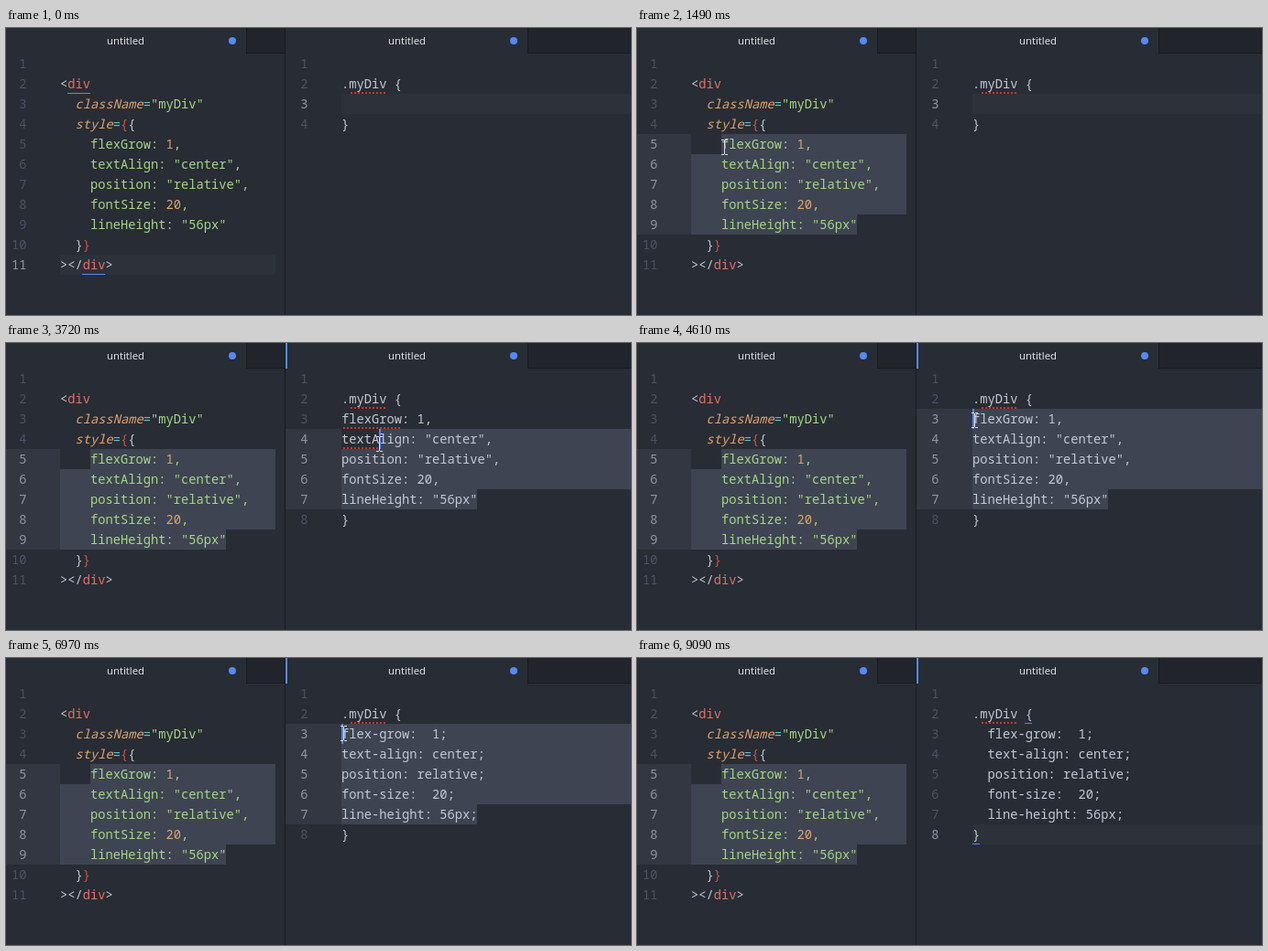
Animation of 682 by 314 pixels, one loop 9520 ms. Source, as an HTML page with a canvas:

```html
<!DOCTYPE html>
<html lang="en">
<head>
<meta charset="utf-8">
<title>Inline style to CSS</title>
<style>
html, body { margin: 0; width: 100%; height: 100%; overflow: hidden; background: #282c34; }
canvas { display: block; width: 682px; height: 314px; }
</style>
</head>
<body>
<canvas id="stage"></canvas>
<script>
const W = 682, H = 314, LOOP = 9520;
const TOP = 28, ROW = 22, CHAR = 8.25;
const MONO = '13.75px "Noto Sans Mono", monospace';
const C = {
  bg: '#282c34', bar: '#21252b', border: '#181a1f', line: '#2c313a', gutter: '#323741',
  select: '#3e4451', text: '#c3c9d4', dim: '#4b5363', number: '#8f96a3', title: '#e8ebf0',
  red: '#e66d66', green: '#a6d687', orange: '#dfa46e', cyan: '#5fc3cf', brick: '#cc5546',
  blue: '#528bff', accent: '#568af2', spell: '#c8372d', mouse: '#dcdee2'
};

const canvas = document.getElementById('stage');
const ctx = canvas.getContext('2d');
const ratio = window.devicePixelRatio || 1;
canvas.width = W * ratio;
canvas.height = H * ratio;
ctx.scale(ratio, ratio);

// A line of code is a list of [text, color, italic] tokens.
const plain = s => [[s, 'text']];
const prop = (name, value, color, end = ',') =>
  [[`    ${name}: `, 'green'], [value, color], [end, 'green']];
const jsx = [
  [],
  [['<', 'text'], ['div', 'red']],
  [['  className', 'orange', true], ['=', 'cyan'], ['"myDiv"', 'green']],
  [['  style', 'orange', true], ['=', 'cyan'], ['{', 'brick'], ['{', 'text']],
  prop('flexGrow', '1', 'orange'),
  prop('textAlign', '"center"', 'green'),
  prop('position', '"relative"', 'green'),
  prop('fontSize', '20', 'orange'),
  prop('lineHeight', '"56px"', 'green', ''),
  [['  }', 'text'], ['}', 'brick']],
  [['></', 'text'], ['div', 'red'], ['>', 'text']]
];
const rule = body => ['', '.myDiv {', ...body, '}'].map(plain);
const pasted = ['flexGrow: 1,', 'textAlign: "center",', 'position: "relative",',
  'fontSize: 20,', 'lineHeight: "56px"'];
const declarations = ['flex-grow:  1;', 'text-align: center;', 'position: relative;',
  'font-size:  20;', 'line-height: 56px;'];
const sheets = [
  [0, rule([''])],
  [2900, rule(pasted)],
  [4930, rule(declarations)],
  [7380, rule(declarations.map(s => '  ' + s))]
];

const LEFT = { x: 0, textX: 59, right: 294, tabEnd: 262, end: 304 };
const RIGHT = { x: 305, textX: 366, right: 682, tabEnd: 569, end: 682 };

const leftBlink = [[670, 1490], [1870, 2230]];
const rightBlink = [[2230, 2610], [2900, 3280], [3460, 4230], [4610, 5210], [5590, 6000],
  [6370, 7200], [7380, 7760], [8170, 8550], [8680, 9060]];

// Each stretch of visible pointer movement: [time, x, y]
const mousePaths = [
  [[160, 388, 306], [520, 272, 214], [670, 272, 214], [1230, 95, 130], [1770, 95, 130],
   [2280, 401, 84], [2470, 401, 84], [2570, 421, 92], [2720, 407, 100], [2900, 407, 100],
   [3260, 524, 172], [3460, 524, 172], [3720, 407, 110], [4050, 368, 84], [4930, 368, 84]],
  [[5950, 368, 94], [6180, 368, 94], [6410, 368, 82], [7200, 368, 82], [7740, 551, 297]],
  [[8550, 600, 306], [8680, 640, 280], [8810, 660, 262], [8960, 660, 262], [9085, 670, 303]]
];

const latest = (steps, t) => steps.filter(s => s[0] <= t).pop()[1];
const within = (spans, t) => spans.some(([a, b]) => t >= a && t < b);
const lineLength = line => line.reduce((n, [s]) => n + s.length, 0);
const rowTop = row => TOP + (row - 1) * ROW;
const colX = (pane, col) => Math.floor(pane.textX + col * CHAR);

function mouseAt(t) {
  const path = mousePaths.find(p => t >= p[0][0] && t < p[p.length - 1][0]);
  if (!path) return null;
  const i = path.findIndex(k => k[0] > t);
  const [t0, x0, y0] = path[i - 1], [t1, x1, y1] = path[i];
  const k = (t - t0) / (t1 - t0);
  return [Math.round(x0 + (x1 - x0) * k), Math.round(y0 + (y1 - y0) * k)];
}

function placeUnder([x, y], pane, lines) {
  const row = Math.floor((y - TOP) / ROW) + 1;
  const col = Math.round((x - pane.textX) / CHAR);
  return [row, Math.max(0, Math.min(col, lineLength(lines[row - 1])))];
}

function fill(color, x, y, w, h) {
  ctx.fillStyle = color;
  ctx.fillRect(x, y, w, h);
}

function write(s, x, y, color, font, align = 'left') {
  ctx.fillStyle = color;
  ctx.font = font;
  ctx.textAlign = align;
  ctx.fillText(s, x, y);
}

function drawTab(pane, titleX, active) {
  fill(C.bar, pane.tabEnd, 0, pane.end - pane.tabEnd, TOP);
  fill(C.border, pane.tabEnd, 0, 1, TOP);
  fill(C.border, pane.tabEnd, TOP - 1, pane.end - pane.tabEnd, 1);
  write('untitled', titleX, 18, C.title, '11.4px "Open Sans", sans-serif', 'center');
  ctx.fillStyle = C.accent;
  ctx.beginPath();
  ctx.arc(titleX + 116.5, 14, 4, 0, Math.PI * 2);
  ctx.fill();
  if (active) fill(C.accent, pane.x, 0, 2, TOP);
}

function drawSpelling(pane, row, col, length) {
  const y = rowTop(row) + 21, x = colX(pane, col);
  ctx.strokeStyle = C.spell;
  ctx.lineWidth = 2;
  ctx.setLineDash([2, 2]);
  ctx.lineDashOffset = 2;
  ctx.beginPath();
  ctx.moveTo(x, y);
  ctx.lineTo(x + length * CHAR, y);
  ctx.stroke();
}

function drawSelection(pane, from, to) {
  for (let row = from[0]; row <= to[0]; row++) {
    const x = colX(pane, row === from[0] ? from[1] : 0);
    const end = row === to[0] ? colX(pane, to[1]) : pane.right;
    fill(C.gutter, pane.x, rowTop(row), pane.textX - pane.x, ROW);
    fill(C.select, x, rowTop(row), end - x, ROW);
  }
}

function drawEditor(pane, lines, { head, anchor = head, caret, spelling = [], matches = [] }) {
  const [from, to] = [head, anchor].sort((a, b) => a[0] - b[0] || a[1] - b[1]);
  const selected = from[0] !== to[0] || from[1] !== to[1];
  if (!selected) fill(C.line, pane.textX, rowTop(head[0]), pane.right - pane.textX, ROW);
  spelling.forEach(word => drawSpelling(pane, ...word));
  if (selected) drawSelection(pane, from, to);

  lines.forEach((line, i) => {
    const row = i + 1, y = rowTop(row) + 16;
    const current = row >= from[0] && row <= to[0];
    write(row, pane.textX - 36.5, y, current ? C.number : C.dim, MONO, 'right');
    let col = 0;
    for (const [s, color, italic] of line) {
      write(s, pane.textX + col * CHAR, y, C[color], (italic ? 'italic ' : '') + '500 ' + MONO);
      col += s.length;
    }
  });
  for (const [row, col, length] of matches)
    fill(C.blue, colX(pane, col), rowTop(row) + ROW - 1, Math.round(length * CHAR), 1);
  if (caret) fill(C.blue, colX(pane, head[1]), rowTop(head[0]), 2, ROW);
}

function leftState(t, mouse) {
  const caret = within(leftBlink, t);
  if (t < 670) return { head: [11, 6], caret, matches: [[2, 1, 3], [11, 3, 3]] };
  const head = t < 1230 ? placeUnder(mouse, LEFT, jsx) : [5, 4];
  return { head, anchor: [9, 22], caret };
}

function rightState(t, mouse, lines) {
  const state = { head: [3, 0], caret: within(rightBlink, t), spelling: [[2, 1, 5]] };
  if (t >= 3000 && t < 4930)
    state.spelling.push([3, 0, 8], [4, 0, 9], [6, 0, 8], [7, 0, 10]);
  const end = [7, lineLength(lines[6] || [])];
  if (t >= 8680) {
    state.head = [8, 1];
    state.matches = [[2, 7, 1], [8, 0, 1]];
  } else if ((t >= 2900 && t < 3460) || (t >= 4930 && t < 6790)) {
    state.head = end;
  } else if (t >= 3460) {
    state.anchor = end;
    if (t < 4050) state.head = placeUnder(mouse, RIGHT, lines);
  }
  return state;
}

function drawMouse([x, y]) {
  fill(C.mouse, x, y - 7, 1, 15);
  for (const edge of [y - 8, y + 8]) {
    fill(C.mouse, x - 3, edge, 3, 1);
    fill(C.mouse, x + 1, edge, 3, 1);
  }
}

function draw(t) {
  const mouse = mouseAt(t);
  const sheet = latest(sheets, t);
  fill(C.bg, 0, 0, W, H);
  drawTab(LEFT, 130.5, false);
  drawEditor(LEFT, jsx, leftState(t, mouse));
  fill(C.border, 304, 0, 1, H);
  drawTab(RIGHT, 437.5, t >= 2230);
  drawEditor(RIGHT, sheet, rightState(t, mouse, sheet));
  if (mouse) drawMouse(mouse);
}

const start = performance.now();
function tick() {
  draw((performance.now() - start) % LOOP);
  requestAnimationFrame(tick);
}
tick();
</script>
</body>
</html>
```
